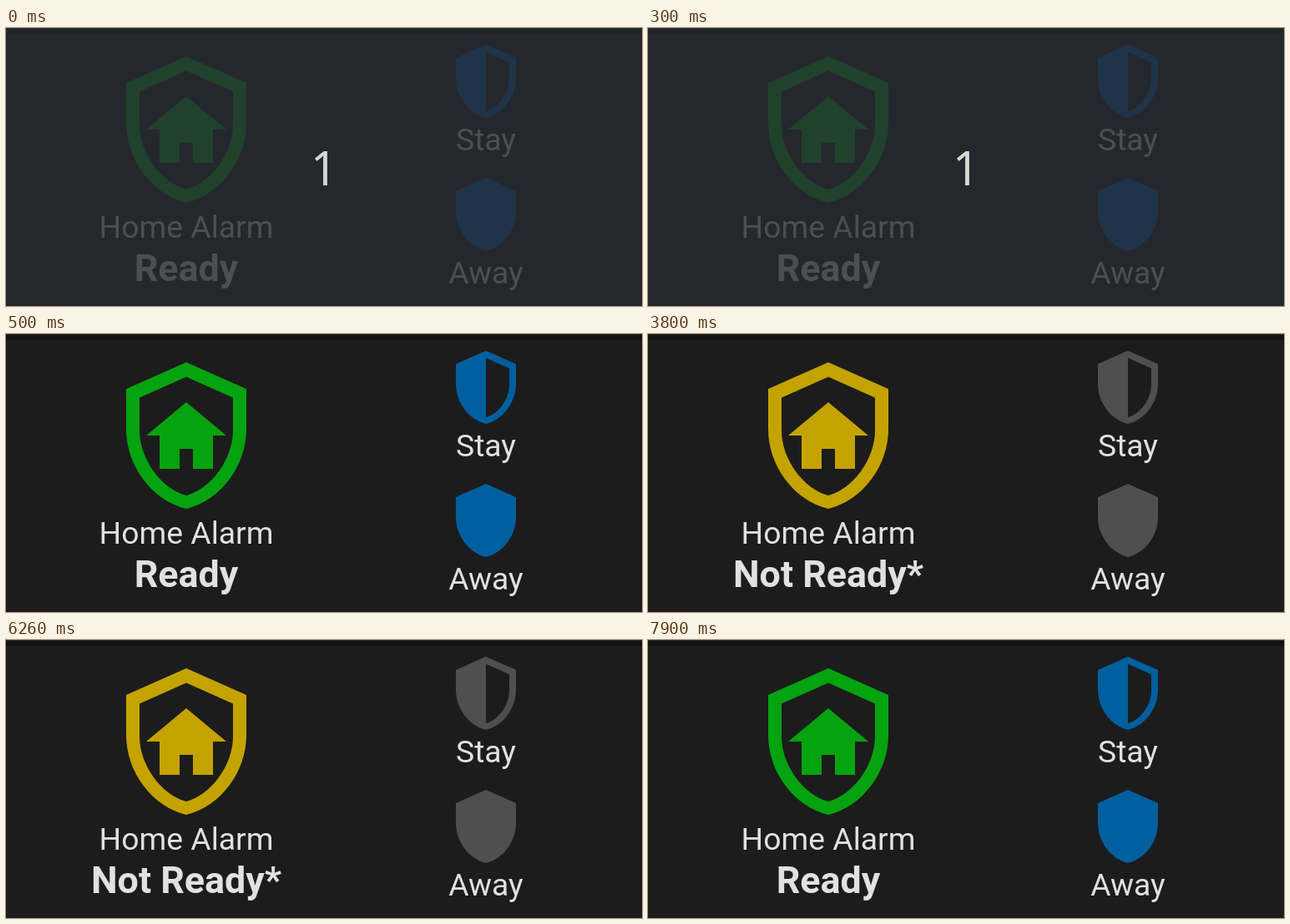
Write an HTML page with a canvas that moves like this. It is 762 px wide and 334 px high and loops after 8 s.

```html
<!DOCTYPE html>
<html lang="en">
<head>
<meta charset="utf-8">
<title>Home alarm panel</title>
<style>
  html, body { margin: 0; width: 100%; height: 100%; overflow: hidden; background: #1c1c1c; }
  canvas { display: block; width: 762px; height: 334px; }
</style>
</head>
<body>
<canvas id="stage" width="762" height="334"></canvas>
<script>
const ctx = document.getElementById('stage').getContext('2d');
const W = 762, H = 334, LOOP = 8000;
const OVERLAY_END = 500, OPEN_AT = 3800, CLOSE_AT = 7900;

// Icons on a 24-unit grid
const OUTLINE = 'M21 11C21 16.55 17.16 21.74 12 23C6.84 21.74 3 16.55 3 11V5L12 1L21 5Z';
const shield = new Path2D(OUTLINE);
const halfShield = new Path2D(OUTLINE + 'M12 21C15.75 20 19 15.54 19 11.22V6.3L12 3.18Z');
const homeShield = new Path2D(OUTLINE +
  'M12 21C15.75 20 19 15.54 19 11.22V6.3L12 3.18L5 6.3V11.22C5 15.54 8.25 20 12 21Z' +
  'M12 7L18 12H16V17H13V14H11V17H8V12H6Z');

function icon(path, x, y, scale, color) {
  ctx.save();
  ctx.translate(x, y);
  ctx.scale(scale, scale);
  ctx.fillStyle = color;
  ctx.fill(path, 'evenodd');
  ctx.restore();
}

function label(text, x, y, font, color = '#e1e1e1') {
  ctx.font = font;
  ctx.fillStyle = color;
  ctx.fillText(text, x, y);
}

function rect(color, x, y, w, h) {
  ctx.fillStyle = color;
  ctx.fillRect(x, y, w, h);
}

function draw(t) {
  const ready = t < OPEN_AT || t >= CLOSE_AT;
  const plain = '37.33px Roboto, sans-serif';
  const button = ready ? '#005f9f' : '#4f4f4f';
  ctx.textAlign = 'center';

  rect('#1c1c1c', 0, 0, W, H);
  rect('#111111', 0, 1, W, 6);
  rect('#2a2a2a', 0, 0, W, 1);

  icon(homeShield, 120, 26, 8, ready ? '#04a30f' : '#c4a300');
  label('Home Alarm', 216, 252, plain);
  label(ready ? 'Ready' : 'Not Ready*', 216, 304, 'bold 44.8px Roboto, sans-serif');

  icon(halfShield, 527, 16, 4, button);
  label('Stay', 575, 147, plain);
  icon(shield, 527, 176, 4, button);
  label('Away', 575, 307, plain);

  if (t < OVERLAY_END) {
    rect('rgba(39, 42, 50, 0.8)', 0, 1, W, H - 1);
    label('1', W / 2, 189, '56px "Noto Sans", sans-serif', '#d6d8d0');
  }
}

function tick() {
  draw(performance.now() % LOOP);
  requestAnimationFrame(tick);
}
tick();
</script>
</body>
</html>
```
